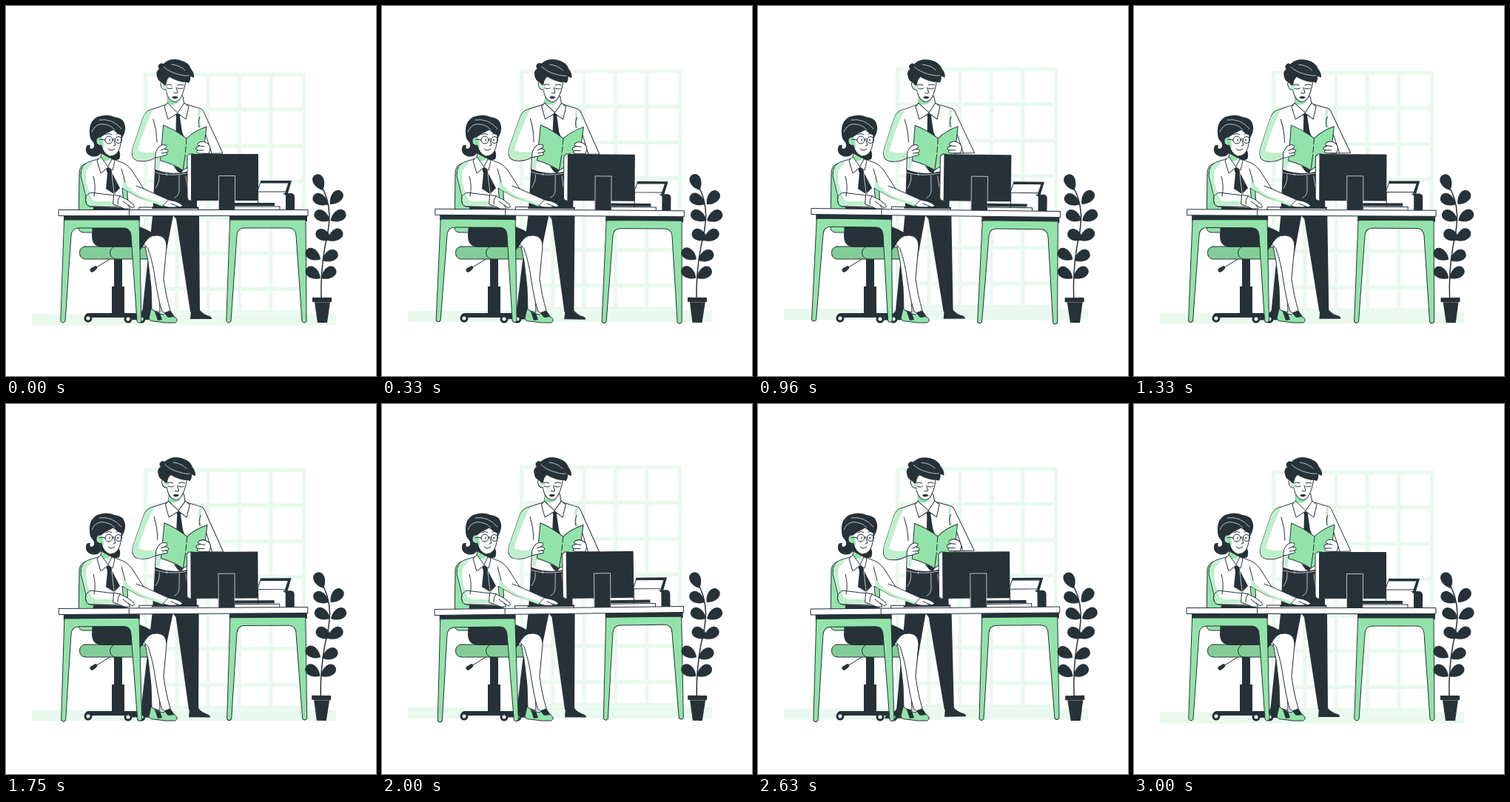
An HTML page that plays this animation: 500x500 px, repeating every 3040 ms.

```html
<!DOCTYPE html>
<html lang="en">
<head>
<meta charset="utf-8">
<title>Office</title>
<style>
html, body { margin: 0; width: 100%; height: 100%; overflow: hidden; background: #fff }
svg { display: block; width: 100vw; height: 100vh }
.o { stroke: #263238; stroke-width: 1; stroke-linejoin: round; stroke-linecap: round }
.w { fill: #fff }
.g { fill: #92e3a9 }
.s { fill: #bef0cb }
.k { fill: #83cc98 }
.d { fill: #263238 }
.l { fill: none }
.h { fill: none; stroke: #fff; stroke-width: .7; stroke-linecap: round }
</style>
</head>
<body>
<svg viewBox="0 0 500 500">
  <g id="room">
    <path id="grid" fill="none" stroke="#e9f9ee" stroke-width="5"/>
    <path fill="#e9f9ee" d="M35 416.500H446V431.500H35z"/>
  </g>

  <g id="man">
    <!-- trousers and shoes -->
    <path class="d" d="M201 220H246L249 250L261 284L262 413H249L230 288L226 283L213 350L204 415H184L198 284z"/>
    <path class="d" d="M250 411H262Q267 417 275 419Q278 420 278 423H249zM185 410H203V424H168Q168 420 175 418Q182 416 185 410z"/>
    <path class="h" d="M202 225Q222 231 245 226M207 228Q208 238 202 246M217 229V225M234 229V250Q233 257 228 259M243 230L245 245"/>
    <!-- shirt -->
    <path class="o w" d="M217 133L193 141Q187 144 184 154L171 193Q168 206 177 209Q190 212 202 205L201 221Q222 230 247 224L248 200L293 199L268 145Q266 139 261 138L244 133z"/>
    <path class="s" d="M194 141Q187 144 184 154L171 193Q169 206 177 208Q190 211 202 204L202 197Q187 200 178 195Q183 176 193 153L199 140z"/>
    <path class="s" d="M204 204L202 219L207 221L209 207zM260 139Q258 152 261 164L264 165Q261 152 263 140z"/>
    <path class="o l" d="M199 153Q204 168 204 184M262 150Q259 156 261 164M270 174L278 199"/>
    <!-- neck, collar and tie -->
    <path class="o w" d="M219 118L218 135L232 145L241 134L239 122z"/>
    <path class="g" d="M218.500 118L218 132Q228 136 234 129L228 130z"/>
    <path class="d" d="M229 144L236 144L235 150L238 170L244 185L236 224L228 216L230 150z"/>
    <path class="o w" d="M218 131L214 136L219 153L232 145L243 153L247 136L241 131L232 144z"/>
    <!-- head -->
    <path class="o w" d="M214 99Q208 102 209 107Q211 114 216 113Q217 122 222 127Q228 132 234 127Q240 120 243 101L230 90z"/>
    <path class="s" d="M214 102Q210 103 211 108Q213 112 216 112L217 117Q219 111 217 103z"/>
    <path class="d" d="M214 107L210 103Q205 101 204 95Q202 88 207 85Q203 80 210 77Q212 79 214 77Q222 70 235 73Q247 76 250 85Q255 91 254 97L249 95Q250 100 247 104Q243 102 240 103Q229 101 221 96Q217 99 216 107z"/>
    <path class="h" d="M213 82Q220 89 232 92Q242 95 247 94M224 79Q235 80 242 87"/>
    <path class="o l" d="M217 107Q219 105 224 107M218 111Q221 113 225 111M232 107Q236 105 240 107M232 111Q236 113 239 111M230 110L232 117Q230 119 227 117"/>
    <path class="d" d="M224 123Q228 121 233 123Q228 128 224 123z"/>
    <!-- book and hands -->
    <path class="o g" d="M213 161Q230 168 244 179Q254 169 271 163L266 205L239 222Q225 213 209 209z"/>
    <path class="o l" d="M244 179L242 202" stroke-dasharray="8 3"/>
    <path class="o l" d="M242 202L239 222"/>
    <path class="d" d="M226 216L239 222L237 226L232 224z"/>
    <path class="o w" d="M202 205Q201 196 207 190Q212 186 216 188Q219 190 214 193L218 194Q221 197 216 198L218 200Q217 203 213 202Q210 204 202 205z"/>
    <path class="o l" d="M214 193L209 195M216 198L210 199"/>
    <path class="o w" d="M274 199Q278 191 273 186Q266 181 260 185Q257 188 262 189L257 191Q255 194 259 195Q256 198 260 199z"/>
    <path class="o l" d="M262 189L268 190M259 195L267 195"/>
  </g>

  <g id="woman">
    <!-- chair -->
    <path class="o g" d="M107 213Q99 216 99 226L98 300Q99 306 105 306H160Q166 270 164 250L150 220z"/>
    <path class="d" d="M146 341H157V379H160V415H180Q185 416 185 421H107Q106 416 111 415H143V379H146z"/>
    <g stroke="#263238" stroke-width="3" fill="#fff"><circle cx="111" cy="422" r="4"/><circle cx="165" cy="423" r="4"/><circle cx="183" cy="423" r="4"/></g>
    <path class="o l" d="M121 354L142 341"/>
    <path class="d" d="M114 355L121 351Q125 353 122 356L117 360Q112 359 114 355z"/>
    <path class="o k" d="M107 325H183Q191 326 191.500 334V342H107Q99.500 341 99.500 333.500Q99.500 326 107 325z"/>
    <path class="o l" d="M146 325Q139 330 141 336Q142 341 148 342"/>
    <!-- legs and shoes -->
    <path class="o w" d="M188 325L192 345L196 380L197 411L208 414L207 384L210 330z"/>
    <path class="o w" d="M185 320Q192 309 205 310Q217 311 217 325L213 368Q216 392 222 411Q217 417 211 413Q206 398 202 372Q199 348 192 328z"/>
    <path class="o g" d="M196 409L193 422Q194 426 200 426L216 428H228Q232 427 231 423Q226 420 222 412L216 414L213 417L204 415z"/>
    <path class="d" d="M201 413L208 415L211 424L205 425zM214 415L222 412L228 420L219 421z"/>
    <path class="d" d="M118 271H161L165 284L177 297Q190 301 202 309Q192 311 185 325L180 331Q176 325 165 326H130Q116 325 116 311z"/>
    <!-- blouse -->
    <path class="o w" d="M127 206L111 211Q101 215 101 229L108 257Q106 270 114 271L160 273L157 246L180 259L218 271L222 263L186 247L170 222Q163 213 155 211L143 206z"/>
    <path class="s" d="M113 211Q102 215 102 229L109 256Q107 269 114 270H121L155 268V264L122 264Q114 263 114 255Q106 238 109 222L118 211z"/>
    <path class="s" d="M157 230Q163 248 185 258L214 268L212 271L180 259L159 247z"/>
    <path class="o l" d="M118 230Q122 243 119 257M108 257L114 252L155 257M108 258Q106 270 114 271L151 271M156 220L161 238M186 247L176 243"/>
    <path class="o w" d="M146 255L154 257Q165 261 172 268Q175 272 171 273L165 269L168 274L160 274Q151 270 145 268z"/>
    <path class="o l" d="M158 264L165 269M154 257Q150 262 151 268"/>
    <path class="o w" d="M220 262L229 264Q238 267 239 271Q235 273 230 270L232 273H222L212 270z"/>
    <path class="o l" d="M223 267L230 270"/>
    <!-- neck, collar and tie -->
    <path class="o w" d="M129 196L128 209L138 219L145 208L144 198z"/>
    <path class="g" d="M130 198L129 208Q138 212 141 205z"/>
    <path class="d" d="M135 219L142 218L143 225L154 246L146 254L135 247L137 226z"/>
    <path class="h" d="M143 226L146 253"/>
    <path class="o w" d="M128 204L123 209L128 226L138 218L144 222L147 210L144 205L138 217z"/>
    <!-- head -->
    <path class="d" d="M113 172Q112 156 123 150Q136 145 147 150Q159 151 161 162Q162 170 157 178L152 194Q156 200 153 207Q146 210 141 206L128 199Q124 205 115 203Q107 200 108 192Q109 187 114 188Q112 193 116 193Q121 191 118 184Q113 180 113 172z"/>
    <path class="o w" d="M128 177Q122 177 122 183Q123 189 129 188Q131 199 140 203Q148 203 152 196Q156 188 156 174Q150 172 145 167Q136 171 128 177z"/>
    <path class="g" d="M127 179Q123 178 123 183Q124 188 129 187L132 194Q132 184 130 178z"/>
    <path class="h" d="M116 170Q121 157 135 160Q143 162 147 167M126 154Q143 151 156 166"/>
    <g class="o l"><circle cx="139" cy="181" r="5"/><circle cx="152" cy="181" r="4.500"/><path d="M134 181L126 180M144 180H147.500M146 182L148 188L145 189M138 193Q142 197 147 193M135 174Q139 171 143 174M149 173Q152 171 155 174"/></g>
    <circle class="d" cx="140" cy="181" r="1"/><circle class="d" cx="151" cy="181" r="1"/>
  </g>

  <g id="desk">
    <!-- printer -->
    <path class="o w" d="M341 249H374Q380 249 380 255V276H341z"/>
    <path class="d" d="M374 253H386Q390 254 390 258V276H378V256z"/>
    <path class="d" d="M344 236H386L381 253H377L381 240H344z"/>
    <path class="o w" d="M344 239H382L378 251H340z"/>
    <!-- screen and papers -->
    <path class="o w" d="M309 271H370V276H309z"/>
    <path class="d" d="M309 266H363V270H309z"/>
    <path class="d" d="M246 260H258V272H236z"/>
    <path class="o w" d="M180 272H260V276H180z"/>
    <path class="d" d="M197 272H260V274H197z"/>
    <path class="o w" d="M248 200H254V263H248Q245 262 245 258V203z"/>
    <rect class="d" x="250" y="200" width="91" height="63" rx="1"/>
    <path class="d" d="M287 230H309V276H287z"/>
    <path class="h" d="M287.500 275V229.500H309.500V263"/>
    <!-- table -->
    <path class="d" d="M78 283H181V291H78zM302 283H407V291H302z"/>
    <path class="o g" d="M79 289H180L183 426Q180 430 177 426L169 310Q168 300 159 300H99Q89 300 88 310L80 426Q77 430 74 426z"/>
    <path class="o g" d="M303 289H405L406 426Q403 430 400 426L392 310Q391 300 382 300H322Q313 300 312 310L304 426Q301 430 298 426z"/>
    <path class="o w" d="M71.500 275.500H408V283.500H71.500z"/>
    <path class="o l" d="M166.500 276V283"/>
  </g>

  <g id="plant">
    <path class="o l" style="stroke-width:1.500" d="M426 395Q425 360 431 325Q437 300 437 283Q436 258 425 242"/>
    <g id="leaves" class="d"></g>
    <path class="d" d="M414 394H440V400H438L434 428H421L417 400H414z"/>
    <path class="h" d="M418 400.500H437" stroke-opacity=".4"/>
  </g>
</svg>
<script>
const $ = id => document.getElementById(id);

$('grid').setAttribute('d',
  [188.5, 231, 273, 315.5, 358, 402.5].map(x => `M${x} 90V416`).join('') +
  [92.5, 140, 189, 237, 286, 334, 382.5, 413.5].map(y => `M186 ${y}H405`).join(''));

// Each leaf: centre x, centre y, direction of its tip at the stem
const leaves = [[423, 238, 65], [425, 262, 30], [446, 259, 132], [427, 284, 28], [449, 284, 150],
  [429, 310, 28], [445, 310, 145], [415, 336, 32], [438, 338, 152], [415, 361, 35], [436, 361, 145]];
$('leaves').innerHTML = leaves.map(([x, y, a]) =>
  `<path transform="translate(${x} ${y}) rotate(${a})" d="M-11 0C-11-10 4-10 12 0C4 10-11 10-11 0"/>`).join('');

// Linear swing through 0, 1, 0, -1, 0
const swing = p => {
  p %= 1;
  return p < .25 ? 4 * p : p < .75 ? 2 - 4 * p : 4 * p - 4;
};
const turn = (id, angle, x, y) => $(id).setAttribute('transform', `rotate(${angle} ${x} ${y})`);

const LOOP = 3040, STEP = 1000 / 24;
const start = performance.now();

function draw() {
  const t = (performance.now() - start) % LOOP;
  const time = Math.min(72, Math.floor((t + 4) / STEP)) * STEP / 1000;
  const p = time / 1.5 % 1;
  $('room').setAttribute('transform', `translate(0 ${-10 * (1 - Math.abs(1 - 2 * p))})`);
  turn('man', swing(p), 231, 248);
  turn('plant', swing(p), 432, 328);
  turn('desk', swing(time / 3), 240, 314);
  requestAnimationFrame(draw);
}
draw();
</script>
</body>
</html>
```
